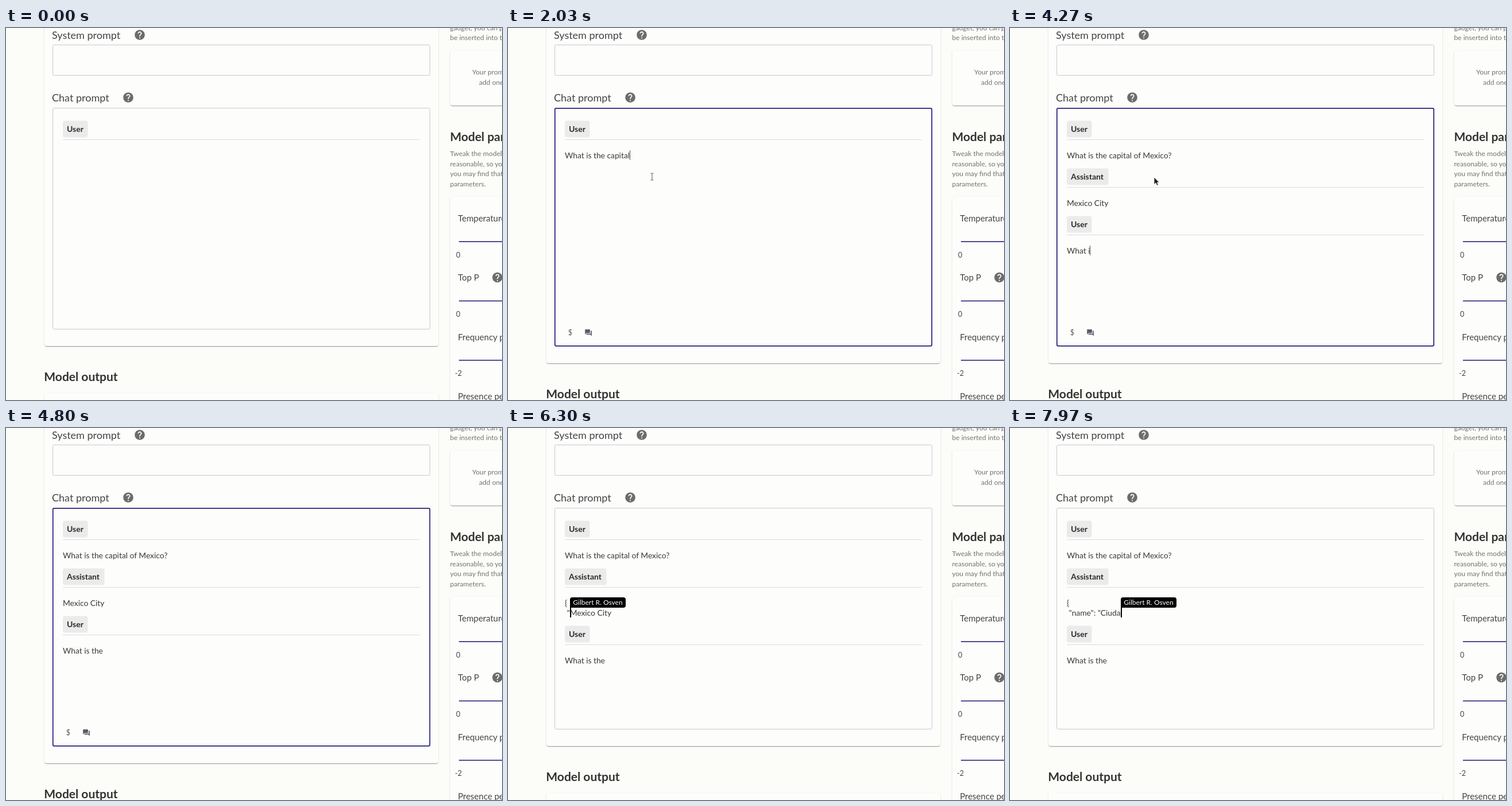
These frames come from a looping animation (864x648 px, 8 s). An HTML page:

```html
<!DOCTYPE html>
<html lang="en">
<head>
<meta charset="utf-8">
<title>Chat prompt editor</title>
<style>
html, body { margin: 0; width: 100%; height: 100%; overflow: hidden; background: #fcfcf8; }
#stage { position: relative; width: 864px; height: 648px; overflow: hidden; background: #fcfcf8; }
.card {
  position: absolute; background: #fdfdfc; border-radius: 4px;
  box-shadow: 0 2px 1px -1px rgba(0,0,0,.2), 0 1px 1px rgba(0,0,0,.14), 0 1px 3px rgba(0,0,0,.12);
}
svg { position: absolute; left: 0; top: 0; }
text { font-family: Lato, sans-serif; font-size: 13.8px; fill: #383838; white-space: pre; }
.head { font-size: 18px; fill: #444; }
.title { font-size: 21px; font-weight: 700; fill: #333; }
.note { font-size: 12.1px; fill: #737373; }
.param { font-size: 15px; fill: #444; }
.tick { font-size: 12.5px; fill: #444; }
.role { font-size: 14px; font-weight: 700; fill: #2b2b2b; }
.chip { fill: #ebebeb; }
.rule { fill: #dcdcd8; }
.field { fill: none; stroke: #c9c9cb; }
.field.focus { stroke: #25207c; stroke-width: 1.75; }
.track { fill: #302c7c; }
.help { fill: #6c6c6a; }
.tag { font-size: 12px; fill: #fff; text-anchor: middle; }
</style>
</head>
<body>
<div id="stage">
  <div class="card" id="editor" style="left:67px;top:-20px;width:686px;height:574px"></div>
  <div class="card" id="output" style="left:67px;top:635px;width:686px;height:80px"></div>
  <div class="card" style="left:774px;top:40px;width:200px;height:95px"></div>
  <div class="card" style="left:774px;top:294px;width:200px;height:500px"></div>

  <svg width="864" height="648" viewBox="0 0 864 648">
    <defs>
      <path id="help" class="help" transform="translate(-10.5 -10.5) scale(.875)" d="M12 2C6.48 2 2 6.48 2 12s4.48 10 10 10 10-4.48 10-10S17.52 2 12 2zm1 17h-2v-2h2v2zm2.07-7.75l-.9.92C13.45 12.9 13 13.5 13 15h-2v-.5c0-1.1.45-2.1 1.17-2.83l1.24-1.26c.37-.36.59-.86.59-1.41 0-1.1-.9-2-2-2s-2 .9-2 2H8c0-2.21 1.79-4 4-4s4 1.79 4 4c0 .88-.36 1.68-.93 2.25z"/>
    </defs>

    <text class="head" x="80" y="18.5">System prompt</text>
    <use href="#help" x="233" y="12"/>
    <rect class="field" x="81.5" y="29.5" width="657" height="53" rx="2"/>
    <text class="head" x="80" y="127.5">Chat prompt</text>
    <use href="#help" x="213" y="121"/>
    <rect class="field" id="box" rx="2"/>

    <text class="note" x="773.4" y="3.5">gadget, you can provide</text>
    <text class="note" x="773.4" y="21">be inserted into the</text>
    <text class="note" x="812" y="81">Your prompt has no</text>
    <text class="note" x="824" y="98.5">add one above</text>

    <text class="title" x="773.4" y="196.5">Model parameters</text>
    <text class="note" x="773.4" y="222.5">Tweak the model here</text>
    <text class="note" x="773.4" y="240.5">reasonable, so you can</text>
    <text class="note" x="773.4" y="258">you may find that some</text>
    <text class="note" x="773.4" y="275.5">parameters.</text>

    <text class="param" x="787.2" y="337">Temperature</text>
    <rect class="track" x="789" y="371.3" width="90" height="1.7"/>
    <text class="tick" x="784" y="399.5">0</text>
    <text class="param" x="787.2" y="440">Top P</text>
    <use href="#help" x="856" y="434.5"/>
    <rect class="track" x="789" y="474.6" width="90" height="1.7"/>
    <text class="tick" x="784" y="503">0</text>
    <text class="param" x="787.2" y="543.5">Frequency penalty</text>
    <rect class="track" x="789" y="577.9" width="90" height="1.7"/>
    <text class="tick" x="782" y="606">-2</text>
    <text class="param" x="787.2" y="647">Presence penalty</text>

    <text class="title" id="outTitle" x="66.3" y="615">Model output</text>

    <g>
      <rect class="chip" x="99" y="161.5" width="43.5" height="29" rx="4"/>
      <text class="role" x="106" y="181.3">User</text>
      <rect class="rule" x="99" y="194" width="622" height="1"/>
      <text id="ask" x="99" y="227"></text>
    </g>
    <g id="reply" transform="translate(0 83)">
      <rect class="chip" x="99" y="161.5" width="72.5" height="29" rx="4"/>
      <text class="role" x="106" y="181.3">Assistant</text>
      <rect class="rule" x="99" y="194" width="622" height="1"/>
      <text id="line1" x="99" y="227"></text>
      <text id="line2" x="99" y="244"></text>
    </g>
    <g id="next">
      <rect class="chip" x="99" y="161.5" width="43.5" height="29" rx="4"/>
      <text class="role" x="106" y="181.3">User</text>
      <rect class="rule" x="99" y="194" width="622" height="1"/>
      <text id="ask2" x="99" y="227"></text>
    </g>

    <g id="tools" fill="#5c5c66">
      <text x="104.7" y="505.5" style="font-size:12.5px;fill:#555">$</text>
      <path transform="translate(133 494.2) scale(.583)" d="M21 6h-2v9H6v2c0 .55.45 1 1 1h11l4 4V7c0-.55-.45-1-1-1zm-4 6V3c0-.55-.45-1-1-1H3c-.55 0-1 .45-1 1v14l4-4h10c.55 0 1-.45 1-1z"/>
    </g>

    <rect id="caret" width="1" height="17" fill="#555"/>

    <g id="peer">
      <rect x="0" y="-15" width="2" height="18"/>
      <path d="M0 -14V-28a4 4 0 0 1 4-4H93a4 4 0 0 1 4 4V-18a4 4 0 0 1-4 4Z"/>
      <text class="tag" x="48.5" y="-19">Gilbert R. Osven</text>
    </g>

    <path id="arrow" d="M0 0V12.5L3 9.8 5 14.3 7.2 13.3 5.2 9H9Z" fill="#222" stroke="#fff" stroke-width=".7"/>
    <path id="beam" d="M-2.5 -6H-.8L0 -5.2 .8 -6H2.5M0 -5.2V5.2M-2.5 6H-.8L0 5.2 .8 6H2.5" fill="none" stroke="#555"/>
  </svg>
</div>

<script>
const LOOP = 8000, LEFT = 99, GROWTH = 29.6;
const FOCUS = 1040, REPLY = 2900, NEXT = 3800, LEAVE = 4700, BLUR = 5100, END_KEY = 7130;
const QUESTION = 'What is the capital of Mexico?';
const CITY = 'Mexico City';
const JSON_START = '{\n "name": "';

const $ = id => document.getElementById(id);
const pen = document.createElement('canvas').getContext('2d');
const clamp = v => Math.min(1, Math.max(0, v));
const ramp = (t, a, b) => clamp((t - a) / (b - a));
const smooth = u => u * u * (3 - 2 * u);
const show = (id, on) => { $(id).style.display = on ? '' : 'none'; };
const move = (id, x, y) => $(id).setAttribute('transform', `translate(${x} ${y})`);

function width(text) {
  pen.font = '13.8px Lato, sans-serif';
  return pen.measureText(text).width;
}

// Number of keys pressed at time t; keys holds [time, count] pairs.
function count(t, ...keys) {
  let [t0, n0] = keys[0];
  for (const [t1, n1] of keys) {
    if (t < t1) return Math.floor(n0 + (n1 - n0) * ramp(t, t0, t1));
    [t0, n0] = [t1, n1];
  }
  return n0;
}

// Text before and after the collaborator's caret.
function peerEdit(t) {
  const head = JSON_START.slice(0, count(t, [5390, 0], [6200, 4], [6340, 4], [6790, 12]));
  if (t < END_KEY) return [head, CITY];
  const kept = CITY.slice(0, CITY.length - count(t, [7240, 0], [7660, 11]));
  return [head + kept + 'Ciuda'.slice(0, count(t, [7740, 0], [7965, 5])), ''];
}

function drawBox(focused, grow) {
  const inset = focused ? .75 : .5;
  const box = $('box');
  box.setAttribute('class', focused ? 'field focus' : 'field');
  box.setAttribute('x', 81 + inset);
  box.setAttribute('y', 139 + inset);
  box.setAttribute('width', 658 - 2 * inset);
  box.setAttribute('height', 386 + grow - 2 * inset);
}

function drawMouse(t) {
  const enter = smooth(ramp(t, 830, 1020));
  const exit = ramp(t, LEAVE, LEAVE + 100);
  const x = -20 + 271 * enter - 271 * exit;
  const y = 350 - 91 * enter + (t > REPLY ? 1 : 0);
  const visible = t >= 830 && t < LEAVE + 100;
  const typing = x > 82 && t < REPLY;
  show('beam', visible && typing);
  show('arrow', visible && !typing);
  move('beam', x, y);
  move('arrow', x, y);
}

function draw(t) {
  const focused = t >= FOCUS && t < BLUR;
  const open = focused ? smooth(ramp(t, FOCUS, FOCUS + 300)) : 0;
  const grow = GROWTH * open;

  // Editor box and everything below it
  drawBox(focused, grow);
  $('editor').style.height = 574 + grow + 'px';
  $('output').style.transform = `translateY(${grow}px)`;
  move('outTitle', 0, grow);
  move('tools', 0, grow);
  $('tools').style.opacity = open;

  // Conversation
  const ask = QUESTION.slice(0, count(t, [1420, 0], [1670, 5], [2030, 19], [2470, 28], [2560, 30]));
  const city = CITY.slice(0, count(t, [3100, 0], [3680, 11]));
  const ask2 = QUESTION.slice(0, count(t, [4000, 0], [4270, 6.5], [4480, 12]));
  const [before, after] = t < BLUR ? [city, ''] : peerEdit(t);
  const [line1, line2 = ''] = (before + after).split('\n');
  const broken = before.includes('\n');
  $('ask').textContent = ask;
  $('line1').textContent = line1;
  $('line2').textContent = line2;
  $('ask2').textContent = ask2;
  show('reply', t >= REPLY);
  show('next', t >= NEXT);
  move('next', 0, 166 + (broken ? 17 : 0));

  // Own caret
  const [own, row] = t < REPLY ? [ask, 0] : t < NEXT ? [city, 1] : [ask2, 2];
  show('caret', focused && t < 4780);
  $('caret').setAttribute('x', Math.round(LEFT + width(own)));
  $('caret').setAttribute('y', 213 + 83 * row);

  // Collaborator caret with name tag
  show('peer', t >= BLUR);
  move('peer', Math.round(LEFT + width(before.split('\n').pop())), broken ? 327 : 310);

  drawMouse(t);
}

function tick() {
  draw(performance.now() % LOOP);
  requestAnimationFrame(tick);
}
tick();
</script>
</body>
</html>
```
